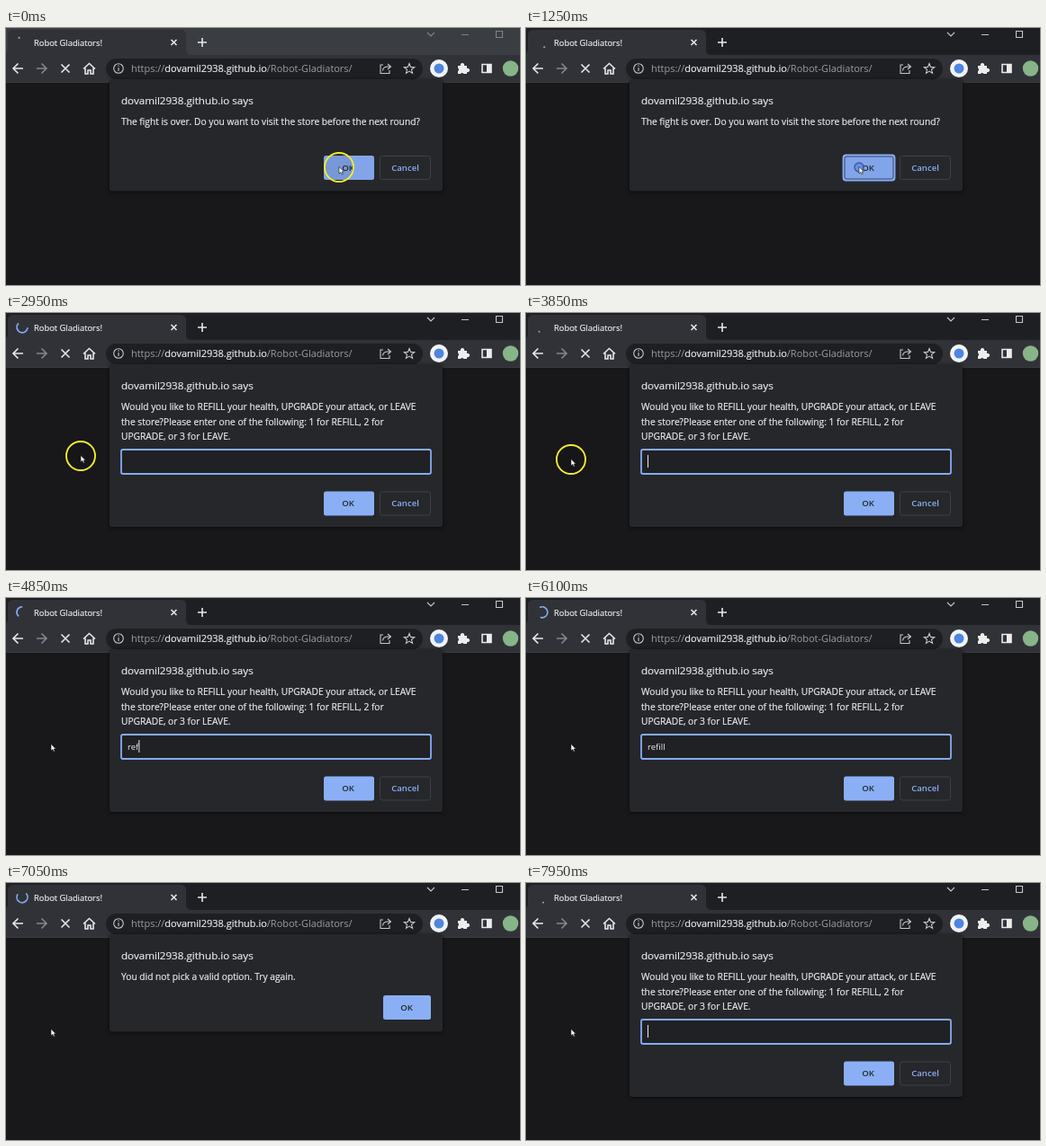
Animation, 571 px wide and 286 px high, one loop 8 s. Source, as an HTML page:

```html
<!DOCTYPE html>
<html lang="en">
<head>
<meta charset="utf-8">
<title>Robot Gladiators!</title>
<style>
  html, body { margin: 0; width: 100%; height: 100%; overflow: hidden; background: #18171a; }
  svg { display: block; width: 571px; height: 286px; font-family: "Open Sans", "Noto Sans", sans-serif; }
  text { white-space: pre; }
  .line { fill: none; stroke: #e6e7ea; stroke-width: 1.6; }
  .dim { stroke: #85878c; }
  .thin { stroke: #c4c6ca; stroke-width: 1.1; }
  .panel { fill: #26272a; filter: drop-shadow(0 1px 2px #0009); }
  .title, .body, .tab { fill: #e8e9ec; stroke: #e8e9ec; stroke-width: .2; }
  .title { font-size: 11.62px; }
  .body { font-size: 10.22px; }
  .tab { font-size: 9.36px; }
  .label { font-size: 9.6px; font-weight: 600; text-anchor: middle; fill: #26292f; }
  .primary { fill: #8aaff5; }
  .cancel { fill: #26272a; stroke: #3d4046; }
  .cancel + .label { fill: #8aaff5; }
</style>
</head>
<body>
<svg viewBox="0 0 571 286">
  <rect width="571" height="286" fill="#18171a"/>

  <!-- tab strip -->
  <rect id="strip" width="571" height="31"/>
  <path d="M0 31V28Q2 27 2 23V8Q2 2 8 2H194Q200 2 200 8V24Q200 30 206 30V31Z" fill="#313237"/>
  <path id="spinner" fill="none" stroke="#84aaf0" stroke-width="1.7" stroke-linecap="round"/>
  <text class="tab" x="31" y="20">Robot Gladiators!</text>
  <path class="line" d="M183.500 13l6 6m0-6l-6 6M213 16h10m-5-5v10"/>
  <path id="controls" class="line thin" d="M468 5l4 4 4-4M506 7.500h8M544.500 3.500h7v7h-7z"/>

  <!-- toolbar -->
  <rect y="30" width="571" height="31" fill="#313237"/>
  <path d="M0 60.500H571" stroke="#3a3b3f"/>
  <path class="line" d="M19 45H8m5.500-5.500L8 45l5.500 5.500M61.500 40.500l9 9m0-9l-9 9M86 45.500l6.500-6 6.500 6M88 44.500v6.500h3v-4h3v4h3v-6.500"/>
  <path class="line dim" d="M34 45h11m-5.500-5.500L45 45l-5.500 5.500"/>
  <rect x="111" y="34" width="352" height="23" rx="11.500" fill="#1e1f23"/>
  <g class="line thin">
    <circle cx="125" cy="45" r="5.300"/>
    <path d="M125 44v4M125 41.500v1.300"/>
    <path d="M419 41h-3v9.500h10V47M418.500 47.500q.5-4.500 5.500-4.500h3m-3-3 3.500 3-3.500 3"/>
  </g>
  <path id="star" class="line thin"/>
  <text x="139" y="49" font-size="10.960" fill="#9b9da2">https://<tspan fill="#e8e9ec" stroke="#e8e9ec" stroke-width=".2">dovamil2938.github.io</tspan>/Robot-Gladiators/</text>
  <circle cx="481" cy="45" r="10" fill="#f1f4fa"/>
  <circle cx="481" cy="45" r="5.500" fill="#4f86dd"/>
  <path fill="#eceded" d="M502 42h3a2.200 2.200 0 1 1 4 0h3v3a2.200 2.200 0 1 1 0 4v2h-3.500a2 2 0 0 0-3.500 0h-3v-3a2 2 0 0 0 0-3.500z"/>
  <path class="line" d="M529 40.500h10v9h-10z"/>
  <path fill="#eceded" d="M534 40h5v10h-5z"/>
  <circle cx="560.500" cy="45" r="8.700" fill="#86b58a"/>

  <!-- dialogs -->
  <g id="confirm">
    <rect class="panel" x="115" y="57" width="370" height="124.500" rx="3"/>
    <text class="title" x="128" y="85">dovamil2938.github.io says</text>
    <text class="body" x="128" y="108">The fight is over. Do you want to visit the store before the next round?</text>
    <rect x="353" y="142" width="56" height="27" rx="2.500" fill="#82a4e9"/>
    <g id="focus" fill="none">
      <rect x="352.500" y="141.500" width="57" height="28" rx="3" stroke="#8aaff5" stroke-width="1.800"/>
      <rect x="354" y="143" width="54" height="25" rx="2" stroke="#33466f"/>
    </g>
    <text class="label" x="380" y="158.500">OK</text>
    <rect class="cancel" x="415.500" y="142.500" width="56" height="26" rx="2.500"/>
    <text class="label" x="443.500" y="158.500">Cancel</text>
  </g>
  <g id="alert">
    <rect class="panel" x="115" y="57" width="370" height="108.500" rx="3"/>
    <text class="title" x="128" y="85">dovamil2938.github.io says</text>
    <text class="body" x="128" y="108">You did not pick a valid option. Try again.</text>
    <rect class="primary" x="419" y="125" width="53" height="27" rx="2.500"/>
    <text class="label" x="445" y="142">OK</text>
  </g>
  <g id="prompt">
    <rect class="panel" x="115" y="57" width="370" height="181" rx="3"/>
    <text class="title" x="128" y="85">dovamil2938.github.io says</text>
    <text class="body"><tspan x="128" y="108">Would you like to REFILL your health, UPGRADE your attack, or LEAVE</tspan><tspan x="128" y="124.500">the store?Please enter one of the following: 1 for REFILL, 2 for</tspan><tspan x="128" y="141">UPGRADE, or 3 for LEAVE.</tspan></text>
    <rect x="128" y="152" width="344" height="27" rx="2" fill="#202124" stroke="#86abf2" stroke-width="1.800"/>
    <text id="typed" x="135" y="168.500" font-size="9.600" fill="#e8e9ec"></text>
    <path id="caret" d="M135.500 158v14" stroke="#e8e9ec"/>
    <rect class="primary" x="353" y="198.500" width="56" height="27" rx="2.500"/>
    <text class="label" x="380" y="215">OK</text>
    <rect class="cancel" x="415.500" y="199" width="56" height="26" rx="2.500"/>
    <text class="label" x="443.500" y="215">Cancel</text>
  </g>

  <!-- pointer -->
  <g id="pointer">
    <circle id="halo" cy="1" r="16" fill="#00000012" stroke="#f3ee2b" stroke-width="1.900"/>
    <circle id="click" cy="1" fill="#3f66c455" stroke="#3459b5" stroke-width="1.400"/>
    <path id="arrow" d="M0 .5v7.500l1.800-1.600 1.200 2.600 1.300-.6-1.200-2.500h2.300z" fill="#fff" stroke="#111" stroke-width=".6"/>
    <path id="beam" d="M-2-3h4M0-3v8M-2 5h4" fill="none" stroke="#a3a5aa" stroke-width=".9"/>
  </g>
</svg>
<script>
const LOOP = 8000;
const $ = id => document.getElementById(id);
const clamp = x => Math.min(1, Math.max(0, x));
const during = (t, from, to) => clamp((t - from) / (to - from));
const smooth = x => x * x * (3 - 2 * x);
const show = (id, on) => $(id).setAttribute('visibility', on ? 'inherit' : 'hidden');

const WINDOW_FOCUS = 1130;
const KEYS = [[4500, 'r'], [4650, 'e'], [4800, 'f'], [5150, 'i'], [5350, 'l'], [5500, 'l']];
const PROMPT_CLOSE = 6680, PROMPT_REOPEN = 7420;
const CARET_RESETS = [1350, ...KEYS.map(key => key[0]), 7700];
// time, x, y of the pointer tip
const PATH = [[0, 370, 154], [2150, 370, 154], [2700, 83, 158], [3100, 83, 158], [3500, 50, 162], [LOOP, 50, 162]];

const starPoints = Array.from({length: 10}, (_, i) => {
  const r = i % 2 ? 2.6 : 6, a = (i * 36 - 90) * Math.PI / 180;
  return `${448 + r * Math.cos(a)} ${45.5 + r * Math.sin(a)}`;
});
$('star').setAttribute('d', `M${starPoints.join('L')}Z`);

// cubic-bezier(.4, 0, .2, 1), solved by bisection
function fastOutSlowIn(x) {
  let lo = 0, hi = 1;
  for (let i = 0; i < 20; i++) {
    const s = (lo + hi) / 2, q = 1 - s;
    if (1.2 * q * q * s + .6 * q * s * s + s ** 3 < x) lo = s; else hi = s;
  }
  return 3 * (1 - lo) * lo * lo + lo ** 3;
}

// Alternately shrinking and growing arc on a steady rotation
function drawSpinner(t) {
  const half = 666, e = t + 716;
  const eased = 270 * fastOutSlowIn(e % half / half);
  const growing = Math.floor(e / half) % 2;
  const sweep = Math.max(5, growing ? eased : 270 - eased);
  const anchor = -127.7 + 360 * t / 1568 + 270 * Math.floor(e / (2 * half));
  const from = growing ? anchor : anchor - sweep;
  const point = deg => {
    const a = deg * Math.PI / 180;
    return `${18 + 6 * Math.cos(a)} ${15.8 + 6 * Math.sin(a)}`;
  };
  $('spinner').setAttribute('d', `M${point(from)}A6 6 0 ${sweep > 180 ? 1 : 0} 1 ${point(from + sweep)}`);
}

// The strip is paler until the click brings the window to the front
function drawWindowFocus(t) {
  const focused = t >= WINDOW_FOCUS;
  $('strip').setAttribute('fill', focused ? '#1e1f23' : '#3a3d41');
  $('controls').setAttribute('opacity', focused ? 1 : .5);
  show('focus', focused);
}

// Dialogs drop in from above and leave upwards
function drawDialog(id, t, open, close) {
  const left = 1 - during(t, open, open + 200), gone = during(t, close, close + 200);
  const group = $(id);
  group.setAttribute('opacity', (1 - left ** 3) * (1 - gone) ** 1.6);
  group.setAttribute('transform', `translate(0 ${-24 * left ** 2 - 15 * gone})`);
}

function drawInput(t) {
  const typed = t < PROMPT_CLOSE ? KEYS.filter(key => key[0] <= t).map(key => key[1]).join('') : '';
  const text = $('typed');
  if (text.textContent !== typed) text.textContent = typed;
  const width = typed ? text.getComputedTextLength() : 0;
  $('caret').setAttribute('transform', `translate(${width} 0)`);
  const last = CARET_RESETS.filter(time => time <= t).pop();
  const waiting = t >= PROMPT_REOPEN && t < 7700;
  show('caret', !waiting && last !== undefined && (t - last) % 1060 < 530);
}

function drawPointer(t) {
  const i = PATH.findIndex(p => p[0] > t);
  const [t0, x0, y0] = PATH[i - 1], [t1, x1, y1] = PATH[i];
  const k = smooth(during(t, t0, t1));
  const x = x0 + (x1 - x0) * k, y = y0 + (y1 - y0) * k;
  $('pointer').setAttribute('transform', `translate(${x} ${y})`);
  const overInput = t > 1480 && x > 127;
  show('beam', overInput);
  show('arrow', !overInput);
  show('halo', t < 800 || t >= 2150 && t < 3900);
  show('click', t >= 1150 && t < 1380);
  $('click').setAttribute('r', 2 + 6 * during(t, 1150, 1350));
}

function draw(t) {
  drawSpinner(t);
  drawWindowFocus(t);
  drawDialog('confirm', t, -1000, 1330);
  drawDialog('alert', t, 6720, 7350);
  if (t < PROMPT_REOPEN) drawDialog('prompt', t, 1380, PROMPT_CLOSE);
  else drawDialog('prompt', t, PROMPT_REOPEN, LOOP);
  drawInput(t);
  drawPointer(t);
}

const start = performance.now();
function frame() {
  draw((performance.now() - start) % LOOP);
  requestAnimationFrame(frame);
}
frame();
</script>
</body>
</html>
```
